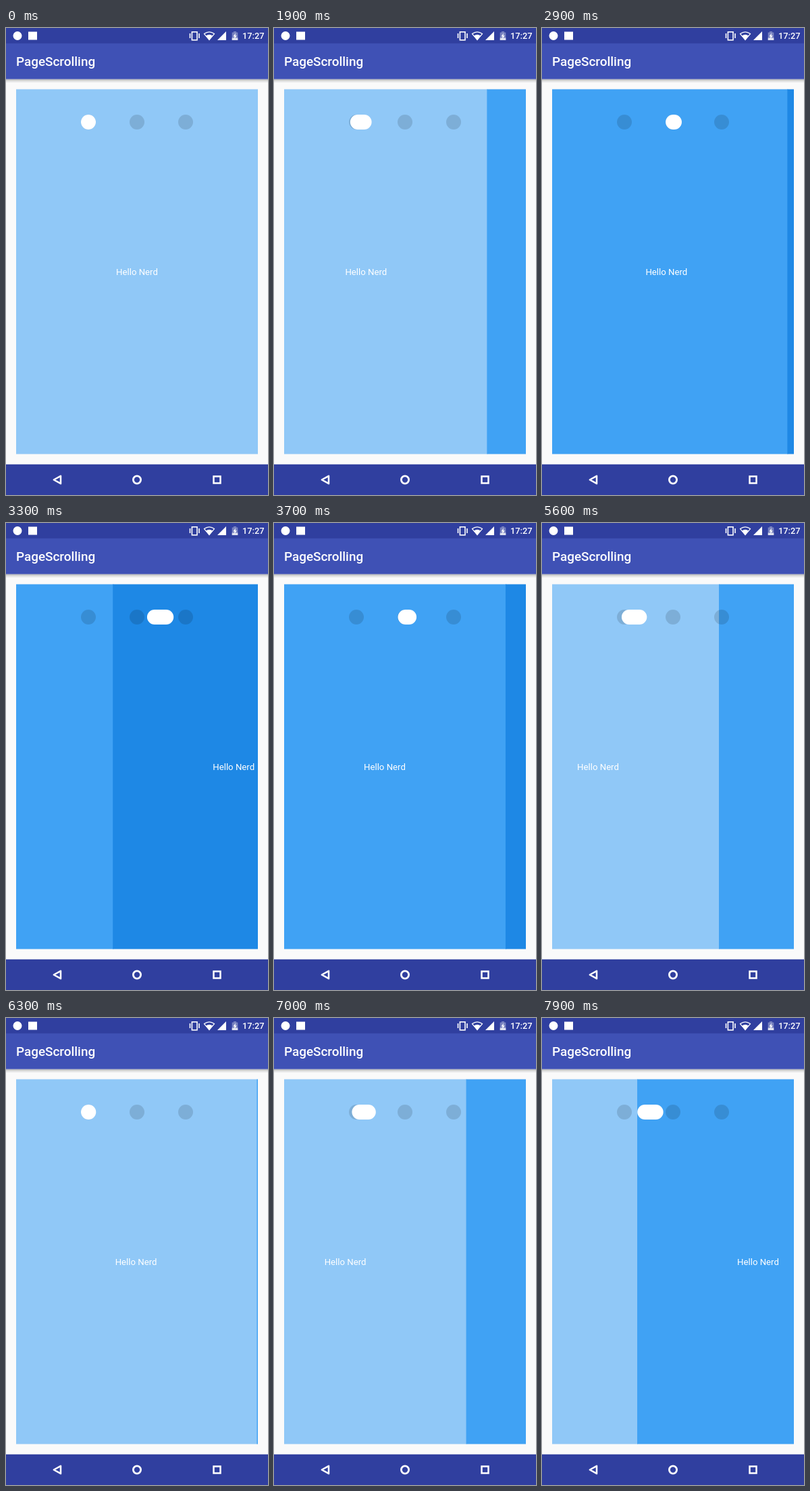
Write an HTML page that moves like this. It is 388 px wide and 690 px high and loops after 8000 ms.

```html
<!DOCTYPE html>
<html lang="en">
<head>
<meta charset="utf-8">
<title>PageScrolling</title>
<style>
  html, body { margin: 0; width: 100%; height: 100%; overflow: hidden; background: #fafafa; }
  svg { display: block; width: 388px; height: 690px; font-family: Roboto, sans-serif; }
</style>
</head>
<body>
<svg viewBox="0 0 388 690" fill="#fff">
  <defs>
    <linearGradient id="shade" x2="0" y2="1">
      <stop offset="0" stop-opacity=".32"/>
      <stop offset=".4" stop-opacity=".12"/>
      <stop offset="1" stop-opacity="0"/>
    </linearGradient>
    <clipPath id="frame"><rect x="15" y="90.6" width="358" height="539"/></clipPath>
  </defs>

  <rect width="388" height="690" fill="#fafafa"/>
  <rect y="75.5" width="388" height="6" fill="url(#shade)"/>
  <rect y="22" width="388" height="53.5" fill="#3f51b5"/>
  <rect width="388" height="22.7" fill="#303f9f"/>
  <rect y="644.7" width="388" height="46" fill="#303f9f"/>
  <text x="15" y="56" font-size="18.9" font-weight="500">PageScrolling</text>

  <!-- status bar -->
  <circle cx="17" cy="11.5" r="6.5"/>
  <rect x="33" y="5.5" width="13" height="12"/>
  <g fill="none" stroke="#fff" stroke-width="1.6">
    <rect x="275.4" y="5.8" width="7.6" height="12"/>
    <path d="M272.5 8v7M286 8v7"/>
    <path d="M293.5 8.6Q301 3 308.500 8.600L301 17.500Z" stroke-width="1.2"/>
  </g>
  <path d="M296 11.500Q301 8 306 11.500L301 17.800Z"/>
  <path d="M326 5V18H313Z"/>
  <path d="M337 5h4v1.500h2.300V18H334.700V6.500H337Z" opacity=".35"/>
  <path d="M334.700 14.500h8.600V18h-8.600Z" opacity=".75"/>
  <path d="M340 7.500L336.500 12.500H338.500L338 16.500L341.700 11.300H339.500Z"/>
  <text x="350" y="16" font-size="12.800" font-weight="500">17:27</text>

  <!-- navigation bar -->
  <g fill="none" stroke="#fff" stroke-width="2.500" stroke-linejoin="round">
    <path d="M70.800 667.500L81 661.800V673.200Z"/>
    <circle cx="194" cy="667.500" r="5.600" stroke-width="2.800"/>
    <rect x="307.500" y="662.500" width="10" height="10" stroke-linejoin="miter"/>
  </g>

  <g clip-path="url(#frame)"><g id="pages"></g></g>
  <g id="dots" fill="#000" fill-opacity=".13"></g>
  <rect id="pill" y="128" height="22" rx="11"/>
</svg>
<script>
const LOOP = 8000, STEP = 100, PAGE = 358, GAP = 72, R = 11;
const $ = id => document.getElementById(id);

$('pages').innerHTML = ['#90c8f7', '#40a2f4', '#1e88e5'].map((color, i) =>
  `<rect x="${15 + i * PAGE}" y="90" width="${PAGE + 1}" height="540" fill="${color}"/>
   <text x="${194 + i * PAGE}" y="365" font-size="13.2" text-anchor="middle">Hello Nerd</text>`).join('');
$('dots').innerHTML = [0, 1, 2].map(i =>
  `<circle cx="${122 + i * GAP}" cy="139" r="${R}"/>`).join('');

// [time in ms, scroll position in pages]
const keys = [
  [0, 0], [1450, 0], [1900, .161], [2300, .55], [2700, 1], [2900, 1.027],
  [3300, 1.6], [3700, 1.084], [4200, 1], [4400, 1], [4900, .78], [5600, .31],
  [6200, 0], [6600, .05], [7000, .247], [7900, .648], [8000, .7]
];

const rate = i => (keys[i + 1][1] - keys[i][1]) / (keys[i + 1][0] - keys[i][0]);

// Monotone tangent: flat at rests and turning points
function slope(i) {
  if (i === 0 || i === keys.length - 1) return 0;
  const a = rate(i - 1), b = rate(i);
  return a * b <= 0 ? 0 : 2 * a * b / (a + b);
}

function scrollAt(t) {
  const i = keys.findIndex((k, n) => n && t < k[0]) - 1;
  const [t0, p0] = keys[i], [t1, p1] = keys[i + 1];
  const d = t1 - t0, u = (t - t0) / d, v = 1 - u;
  return p0 * (1 + 2 * u) * v * v + p1 * u * u * (3 - 2 * u)
    + d * u * v * (slope(i) * v - slope(i + 1) * u);
}

function draw(now) {
  const p = scrollAt(Math.floor(now % LOOP / STEP) * STEP);
  const page = Math.floor(p), f = p - page;
  $('pages').setAttribute('transform', `translate(${-p * PAGE})`);
  // The front edge follows the scroll, the back edge lags behind
  $('pill').setAttribute('x', 122 - R + GAP * (page + f * f));
  $('pill').setAttribute('width', 2 * R + GAP * (f - f * f));
}

const start = performance.now();
function tick() {
  draw(performance.now() - start);
  requestAnimationFrame(tick);
}
tick();
</script>
</body>
</html>
```
